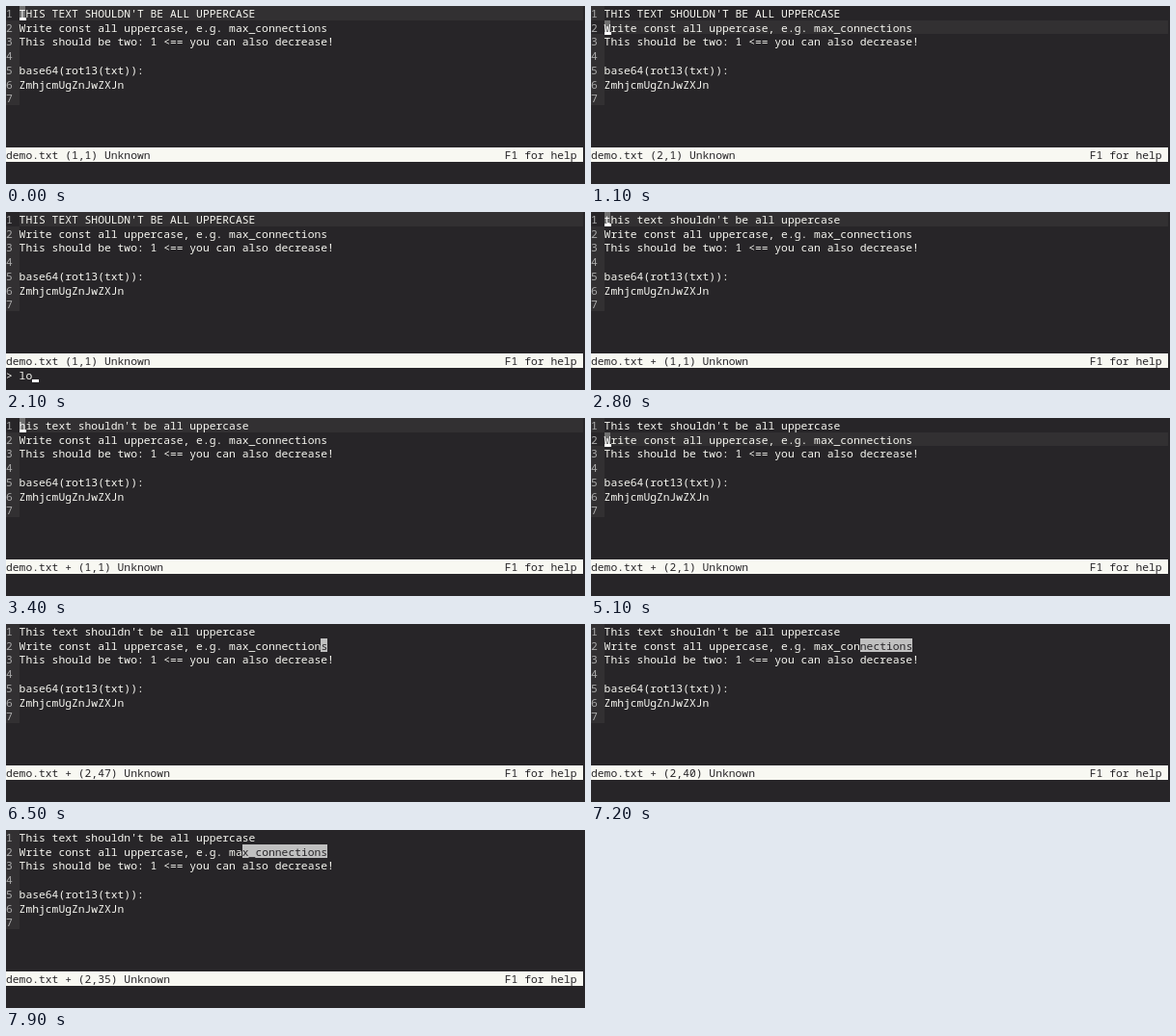
These frames come from a looping animation (600x185 px, 8 s). An HTML page with a canvas:

```html
<!DOCTYPE html>
<html lang="en">
<head>
<meta charset="utf-8">
<title>Terminal editor</title>
<style>
  html, body { margin: 0; width: 100%; height: 100%; overflow: hidden; background: #272528; }
  canvas { display: block; }
</style>
</head>
<body>
<canvas id="screen" width="600" height="185"></canvas>
<script>
const ctx = document.getElementById('screen').getContext('2d');
const LOOP = 8000, STEP = 100, CELL = 6.8, ROW = 14.7, COLS = 88;
const BACK = '#272528', LINE = '#323032', INK = '#f8f8f2', GREY = '#aaaaaa';
const SELECT = '#c0c0c0', CURSOR = '#707070', WHITE = '#ffffff';
const FONT = '500 11.333px "Noto Sans Mono", "DejaVu Sans Mono", monospace';

const TITLE = "THIS TEXT SHOULDN'T BE ALL UPPERCASE";
const REST = [
  'Write const all uppercase, e.g. max_connections',
  'This should be two: 1 <== you can also decrease!',
  '',
  'base64(rot13(txt)):',
  'ZmhjcmUgZnJwZXJn',
  ''
];
const COMMAND = 'lower';
const LAST = REST[0].length;

// Moments of the session in ms
const WANDER = 600, PROMPT = 1500, TYPE = 1900, RUN = 2700, DELETE = 3400, RETYPE = 3500;
const DOWN = 4000, HOME = 4900, END = 5700, MARK = 6500, EXTEND = 6800, EXTENDED = 7900;

const clamp = (v, min, max) => Math.min(max, Math.max(min, v));

function cursorAt(t) {
  if (t < RETYPE) {
    // Three lines down, then back up
    const steps = clamp((t - WANDER) / STEP, 0, 6);
    return [4 - Math.abs(3 - steps), 1];
  }
  if (t < DOWN) return [1, 2];
  if (t < HOME) return [2, 2];
  if (t < END) return [2, 1];
  if (t < MARK) return [2, LAST + 1];
  const p = clamp((t - EXTEND) / (EXTENDED - EXTEND), 0, 1);
  return [2, LAST - Math.round(12 * p * (2 - p))];
}

function firstLine(t) {
  if (t < RUN) return TITLE;
  const rest = TITLE.slice(1).toLowerCase();
  return (t < DELETE ? 't' : t < RETYPE ? '' : 'T') + rest;
}

function box(col, row, cols, color) {
  const x = Math.round(col * CELL), y = Math.round(row * ROW);
  ctx.fillStyle = color;
  ctx.fillRect(x, y, Math.round((col + cols) * CELL) - x, Math.round((row + 1) * ROW) - y);
}

function write(text, col, row, color) {
  ctx.fillStyle = color;
  ctx.fillText(text, col * CELL, Math.round(row * ROW + 12));
}

function underscore(col, row) {
  ctx.fillStyle = WHITE;
  ctx.fillRect(Math.round(col * CELL), Math.round(row * ROW) + 12, 7, 3);
}

function draw(time) {
  const t = Math.floor(time / STEP) * STEP;
  const [line, col] = cursorAt(t);
  const prompting = t >= PROMPT && t < RUN;
  const selecting = t >= MARK;
  const lines = [firstLine(t), ...REST];

  ctx.font = FONT;
  ctx.fillStyle = BACK;
  ctx.fillRect(0, 0, 600, 185);

  lines.forEach((text, row) => {
    const current = row === line - 1 && !selecting;
    if (current) box(2, row, COLS - 2, LINE);
    else box(0, row, 2, LINE);
    write(row + 1, 0, row, GREY);
    write(text, 2, row, INK);
  });

  const row = line - 1, x = col + 1, text = lines[row];
  if (selecting) {
    box(x, row, LAST + 1 - col, SELECT);
    write(text.slice(col - 1), x, row, BACK);
  } else if (!prompting) {
    box(x, row, 1, CURSOR);
    underscore(x, row);
    write(text[col - 1] || '', x, row, WHITE);
  }

  box(0, 10, COLS, INK);
  const dirty = t >= RUN ? ' +' : '';
  write(`demo.txt${dirty} (${line},${col}) Unknown`, 0, 10, BACK);
  write('F1 for help', COLS - 12, 10, BACK);

  if (prompting) {
    const count = t < TYPE ? 0 : Math.max(1, (t - TYPE) / STEP);
    const typed = COMMAND.slice(0, count);
    write('> ' + typed, 0, 11, INK);
    underscore(2 + typed.length, 11);
  }
}

function tick() {
  draw(performance.now() % LOOP);
  requestAnimationFrame(tick);
}
tick();
</script>
</body>
</html>
```
